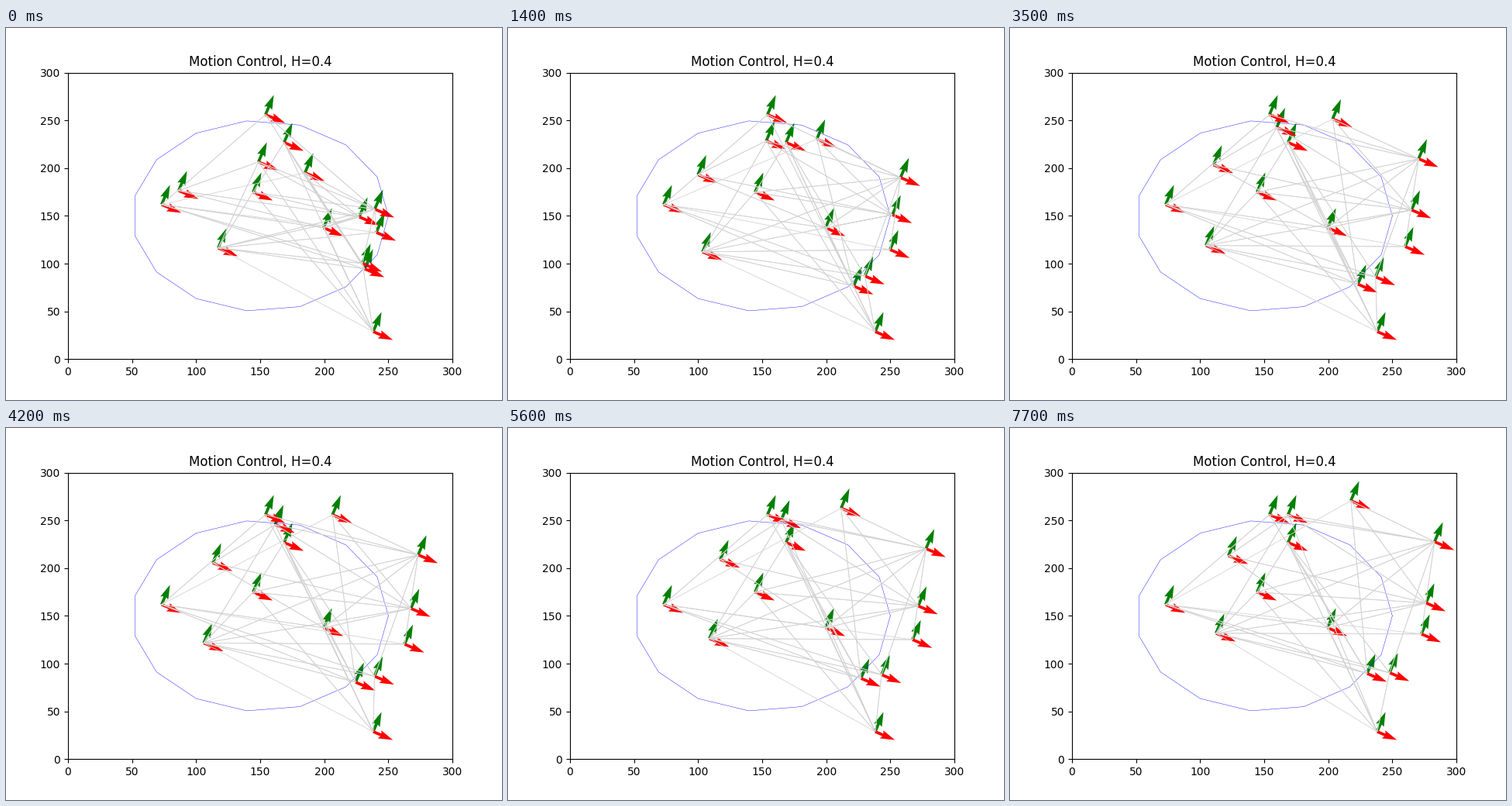
Recreate the animation shown at these times as a matplotlib script. Size 640 px wide and 480 px high, loop 8000 ms.

```python
import numpy as np
import matplotlib.pyplot as plt
from matplotlib.animation import FuncAnimation
from matplotlib.collections import LineCollection

STEP_TICKS = 7        # 100 ms ticks per simulation step
LAST_STEP = 11
HEADING = 0.4
FAST, SLOW = 0.5, 0.9  # decay per step of the two motion modes

# Agent positions in stage pixels, y downwards
FIXED = {
    "A": (335, 111), "B": (359, 147), "C": (319, 211),
    "D": (201, 227), "E": (410, 257), "F": (474, 391),
}
MOVING = {  # start, turn, end
    "a": [(326, 172), (341, 132), (359, 111)],
    "b": [(386, 186), (411, 123), (440, 93)],
    "c": [(223, 209), (258, 179), (282, 164)],
    "d": [(476, 233), (522, 174), (548, 146)],
    "e": [(456, 243), (513, 236), (537, 225)],
    "f": [(478, 263), (505, 284), (531, 265)],
    "g": [(460, 303), (468, 321), (490, 315)],
    "h": [(463, 310), (447, 332), (461, 316)],
    "i": [(274, 283), (251, 283), (266, 264)],
}
KEY_STEPS = np.array([0, 4, LAST_STEP])
NAMES = [*FIXED, *MOVING]

# Links seen by both agents are drawn twice
MUTUAL = ("AD Ad Ah BC BF Bh Bg CF Cd Ce Ci DE Dg Dh Ec Ed Ee EF Fa Fg "
          "ac ad ae ai bd be bh ce df dg di ei fi gi hi").split()
ONE_WAY = "Db Df Fi".split()
LINKS = np.array([[NAMES.index(n) for n in link] for link in MUTUAL * 2 + ONE_WAY])


def modes(step):
    """Rest position plus a fast and a slow exponential decay."""
    return np.stack([np.ones_like(step, float), FAST ** step, SLOW ** step], axis=-1)


def to_data(px):
    return np.column_stack([(px[:, 0] - 80.2) / 496 * 300,
                            (426.4 - px[:, 1]) / 369.6 * 300])


fixed = np.array(list(FIXED.values()), float)
weights = np.linalg.inv(modes(KEY_STEPS)) @ np.array(list(MOVING.values()), float)


def positions(step):
    return to_data(np.vstack([fixed, modes(step) @ weights]))


fig, ax = plt.subplots(figsize=(6.4, 4.8), dpi=100)
ax.set_xlim(0, 300)
ax.set_ylim(0, 300)
ax.set_title(f"Motion Control, H={HEADING}")

ring = np.arange(16) * 2 * np.pi / 15
ax.plot(150 + 100 * np.cos(ring), 150 + 100 * np.sin(ring), "b", lw=0.3)

start = positions(0)
ones = np.ones(len(start))
cos, sin = np.cos(HEADING), np.sin(HEADING)
arrows = [
    ax.quiver(*start.T, sin * ones, cos * ones, color="g"),
    ax.quiver(*start.T, cos * ones, -sin * ones, color="r"),
]
net = LineCollection(start[LINKS], colors="lightgray", linewidths=0.6, zorder=2.5)
ax.add_collection(net, autolim=False)


def update(tick):
    pos = positions(min(tick // STEP_TICKS, LAST_STEP))
    for arrow in arrows:
        arrow.set_offsets(pos)
    net.set_segments(pos[LINKS])
    return [*arrows, net]


anim = FuncAnimation(fig, update, frames=80, interval=100, repeat=True, repeat_delay=0)
plt.show()
```
